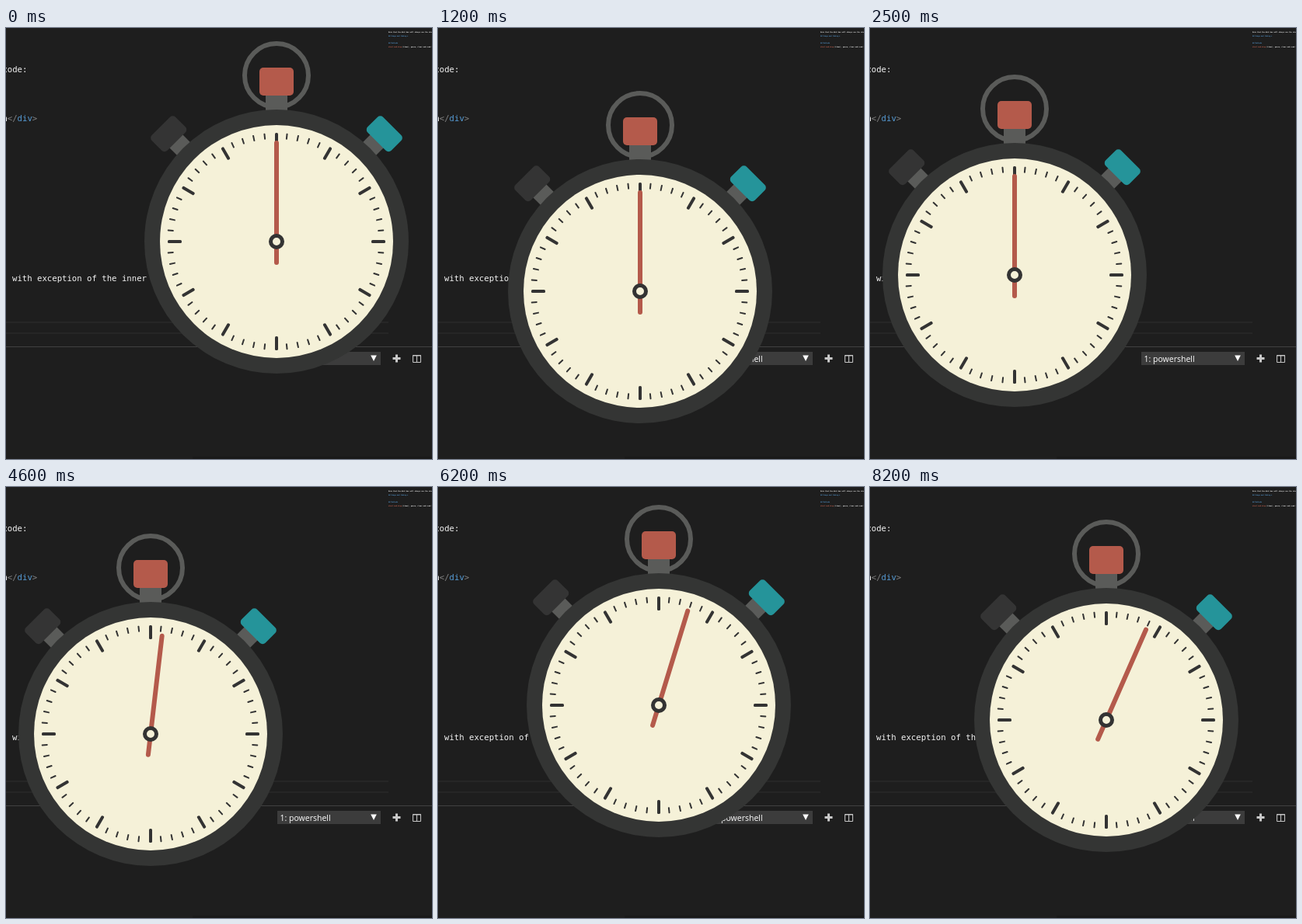
An HTML page that plays this animation: 548x555 px, repeating every 9800 ms.

```html
<!DOCTYPE html>
<html lang="en">
<head>
<meta charset="utf-8">
<title>Stopwatch</title>
<style>
  html, body { margin: 0; width: 100%; height: 100%; overflow: hidden; background: #1e1e1e; }
  svg { display: block; width: 548px; height: 555px; overflow: hidden; }
  text { white-space: pre; }
  .code { font: 10.65px "DejaVu Sans Mono", "Noto Sans Mono", monospace; fill: #f4f4f4; }
  .map { font: bold 2px "DejaVu Sans Mono", "Noto Sans Mono", monospace; fill: #fff; }
  .ui { font: 10.5px "Open Sans", "Noto Sans", sans-serif; fill: #fff; }
  .tag { fill: #808080; }
  .blue { fill: #569cd6; }
  .rust { fill: #e0705a; }
</style>
</head>
<body>
<svg viewBox="0 0 548 555">
  <rect width="548" height="555" fill="#1e1e1e"/>

  <!-- editor -->
  <text class="code" x="-4.6" y="57">code:</text>
  <text class="code" x="-4.6" y="120">n<tspan class="tag">&lt;/</tspan><tspan class="blue">div</tspan><tspan class="tag">&gt;</tspan></text>
  <text class="code" x="8" y="326">with exception of the inner circle and the dial one.</text>
  <path d="M0 379H492M0 393H492" stroke="#2a2a2a" stroke-width="1.6"/>
  <g class="map">
    <text x="492" y="6.3">Note that the dial box will always use the size to show the</text>
    <text class="blue" x="492" y="10.8">## Usage and timing x</text>
    <text class="blue" x="492" y="20.3">## Methods</text>
    <text x="492" y="24.6"><tspan class="rust">start and stop</tspan> (timer), pause, clear and read the</text>
  </g>

  <!-- terminal panel -->
  <path d="M0 410.5H548" stroke="#414141"/>
  <rect x="349" y="417" width="133" height="17" fill="#3c3c3c"/>
  <text class="ui" x="352.5" y="430">1: powershell</text>
  <path d="M469.2 421.5h7.6l-3.8 7.5z" fill="#fff"/>
  <path d="M497.5 425.5h10M502.5 420.5v10" stroke="#c8c8c8" stroke-width="3"/>
  <path d="M523.5 421.5h10v9h-10zM528.5 421v10M523 422h11" fill="none" stroke="#c5c5c5"/>
  <rect x="240" y="552" width="308" height="3" fill="#191919"/>

  <!-- stopwatch, centred on the hub -->
  <g id="watch">
    <circle cy="-214" r="41" fill="none" stroke="#5a5b59" stroke-width="6"/>
    <rect x="-14" y="-190" width="28" height="25" fill="#5a5b59"/>
    <rect x="-22" y="-224" width="44" height="36" rx="5" fill="#b45a4b"/>
    <g transform="rotate(-45)">
      <rect x="-12" y="-186" width="24" height="26" fill="#5a5b59"/>
      <rect id="stop" x="-21.5" y="-210.3" width="43" height="28" rx="5" fill="#343434"/>
    </g>
    <g transform="rotate(45)">
      <rect x="-12" y="-186" width="24" height="26" fill="#5a5b59"/>
      <rect id="start" x="-21.5" y="-210.3" width="43" height="28" rx="5" fill="#25949a"/>
    </g>
    <circle r="170" fill="#343534"/>
    <circle r="150" fill="#f5f1d8"/>
    <g id="ticks" fill="#333"></g>
    <rect id="hand" x="-3" y="-130" width="6" height="160" rx="3" fill="#b45a4b"/>
    <circle r="7.5" fill="#f5f1d8" stroke="#333" stroke-width="5"/>
  </g>
</svg>
<script>
const LOOP = 9800, STEP = 100;
const PRESS_START = 3500, PRESS_STOP = 7200;
const RUN_FROM = 3580, RUN_TO = 7220, DEG_PER_SEC = 6.5;

const smooth = u => u * u * (3 - 2 * u);
const easeOut = u => 1 - (1 - u) ** 1.5;
const clamp = (v, lo, hi) => Math.min(hi, Math.max(lo, v));
const middle = (a, b) => a.map((v, i) => (v + b[i]) / 2);

// each drag starts where the last one ended; "via" bends it into a curve
const home = [348, 275];
const drags = [
  { from: 800, until: 1200, to: [260, 339], ease: smooth },
  { from: 1700, until: 2500, to: [186, 318], via: [129, 455], ease: easeOut },
  { from: 4700, until: 5300, to: [284, 281], ease: smooth },
  { from: 8000, until: 8200, to: [304, 300], ease: smooth }
];

const el = id => document.getElementById(id);
const watch = el("watch"), hand = el("hand"), ticks = el("ticks");

function addTick(i) {
  const major = i % 5 === 0, w = major ? 4 : 2;
  const r = document.createElementNS("http://www.w3.org/2000/svg", "rect");
  // minor marks sit one pixel to the left of the dial's centre
  const attrs = {
    x: -w / 2, y: -140, width: w, height: major ? 18 : 8,
    rx: w / 2.5, transform: `translate(${major ? 0 : -1} 0) rotate(${i * 6})`
  };
  for (const k in attrs) r.setAttribute(k, attrs[k]);
  ticks.appendChild(r);
}

function hubAt(t) {
  let pos = home;
  for (const { from, until, to, via = middle(pos, to), ease } of drags) {
    if (t < from) break;
    const k = ease(clamp((t - from) / (until - from), 0, 1)), j = 1 - k;
    pos = pos.map((p, i) => j * j * p + 2 * j * k * via[i] + k * k * to[i]);
  }
  return pos;
}

function press(id, t, at) {
  const down = t >= at && t < at + STEP;
  el(id).setAttribute("transform", `translate(0 ${down ? 5 : 0})`);
}

function draw(ms) {
  const t = Math.floor((ms % LOOP) / STEP) * STEP;
  const [x, y] = hubAt(t);
  const angle = (clamp(t, RUN_FROM, RUN_TO) - RUN_FROM) / 1000 * DEG_PER_SEC;
  watch.setAttribute("transform", `translate(${x} ${y})`);
  hand.setAttribute("transform", `rotate(${angle})`);
  press("start", t, PRESS_START);
  press("stop", t, PRESS_STOP);
}

for (let i = 0; i < 60; i++) addTick(i);

let begin = null;
function frame(now) {
  if (begin === null) begin = now;
  draw(now - begin);
  requestAnimationFrame(frame);
}
draw(0);
requestAnimationFrame(frame);
</script>
</body>
</html>
```
